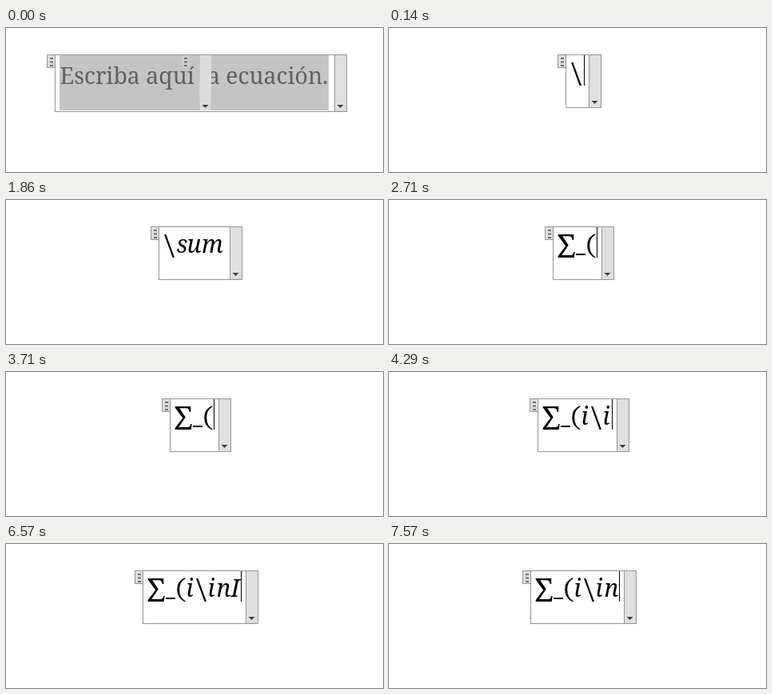
Write an HTML page that moves like this. It is 472 px wide and 180 px high and loops after 8 s.

```html
<!DOCTYPE html>
<html lang="es">
<head>
<meta charset="utf-8">
<title>Editor de ecuaciones</title>
<style>
  html, body { margin: 0; width: 100%; height: 100%; overflow: hidden; background: #fff; }
  svg { display: block; width: 472px; height: 180px; }
  text { font-family: "Noto Serif", "Liberation Serif", serif; }
  .math { font-size: 30px; font-style: italic; fill: #000; }
  .hint { font-size: 28.4px; fill: #606060; }
</style>
</head>
<body>
<svg id="stage" viewBox="0 0 472 180"></svg>
<script>
const LOOP = 8000;
const CENTER = 238.5;
const TOP = 33;
const stage = document.getElementById('stage');

// [start ms, typed text, caret visible]
const steps = [
  [0, null, false],
  [140, '\\', true], [710, '\\', false],
  [1000, '\\s', true], [1140, '\\su', true], [1290, '\\sum', true],
  [1860, '\\sum', false], [2290, '\\sum', true],
  [2430, '∑_', true], [2710, '∑_(', true],
  [3290, '∑_(', false], [3710, '∑_(', true],
  [3860, '∑_(i', true], [4000, '∑_(i\\', true],
  [4290, '∑_(i\\i', true], [4430, '∑_(i\\in', true],
  [5000, '∑_(i\\in', false], [5430, '∑_(i\\inI', true],
  [6000, '∑_(i\\inI', false], [6430, '∑_(i\\inI', true],
  [6710, '∑_(i\\inI)', true], [7290, '∑_(i\\inI)', false],
  [7430, '∑_(i\\inI', true], [7570, '∑_(i\\in', true]
];

const advance = { '\\': 16, s: 13, u: 18.5, m: 28.5, '∑': 23, _: 13, '(': 13, ')': 15, i: 11, n: 18, I: 12 };

const PAREN = 'M11.2 42Q1.2 46 1.2 57Q1.2 68 11.2 72.5L11.6 71.2Q4.2 67 4.2 57Q4.2 47.5 11.6 43.3Z';
const symbols = {
  '\\': '<path d="M1 43H3.4L14 72H11.6Z"/>',
  '∑': '<path transform="translate(.7 43)" d="M0 0H19.5V7H18Q17.2 2.2 14 2.2H5.5L13 13.5L4.5 26H16Q18.7 26 19.6 22H21L20 29H0V27L9.5 14.5L0 1.5Z"/>',
  _: '<path d="M0 67H12V69H0Z"/>',
  '(': `<path d="${PAREN}"/>`,
  ')': `<path transform="translate(14) scale(-1 1)" d="${PAREN}"/>`
};

const rect = (x, y, w, h, fill, extra = '') =>
  `<rect x="${x}" y="${y}" width="${w}" height="${h}" fill="${fill}" ${extra}/>`;

const dots = x => [0, 1, 2].map(i => rect(x, 37 + i * 4.5, 4, 2, '#707070')).join('');

const arrow = (x, y) => `<path d="M${x - 4} ${y}h8l-4 4z" fill="#404040"/>`;

// Equation box: drag handle, field and drop-down strip
function frame(left, width, height) {
  const line = 'stroke="#969696"';
  const strip = left + width - 16;
  return rect(left + .5, TOP + .5, 10, 16, '#dedede', line) + dots(left + 4) +
    rect(left + 10.5, TOP + .5, width - 11, height, '#fff', line) +
    rect(strip + .5, TOP + .5, 15, height, '#dfdfdf', line) +
    arrow(strip + 7.5, TOP + height - 8);
}

function placeholder() {
  return frame(51, 376, 71) +
    rect(67, 34, 337, 69, '#c4c4c4') +
    '<text class="hint" x="67.5" y="70">Escriba aquí la ecuación.</text>' +
    rect(220, 34, 10, 15, '#cecece') + dots(223) +
    '<path d="M243 34H257V66L256 103H243L242 78L243 60Z" fill="#dcdcdc"/>' +
    arrow(249.5, 96);
}

function equation(text, caret) {
  const chars = [...text];
  // A leading backslash carries one extra pixel
  const step = (c, i) => advance[c] + (c === '\\' && i === 0 ? 1 : 0);
  const length = chars.reduce((sum, c, i) => sum + step(c, i), 0);
  const width = length + 38;
  const left = Math.round(CENTER - width / 2);
  let x = left + 16;
  let out = frame(left, width, 66);
  chars.forEach((c, i) => {
    out += symbols[c]
      ? `<g transform="translate(${x})">${symbols[c]}</g>`
      : `<text class="math" x="${x - .5}" y="65.5">${c}</text>`;
    x += step(c, i);
  });
  return out + (caret ? rect(x, 34, 1, 38, '#000') : '');
}

let shown = -1;
function tick(now) {
  const t = now % LOOP;
  const index = steps.findLastIndex(s => s[0] <= t);
  if (index !== shown) {
    const [, text, caret] = steps[index];
    stage.innerHTML = text === null ? placeholder() : equation(text, caret);
    shown = index;
  }
  requestAnimationFrame(() => tick(performance.now() - start));
}
const start = performance.now();
tick(0);
</script>
</body>
</html>
```
